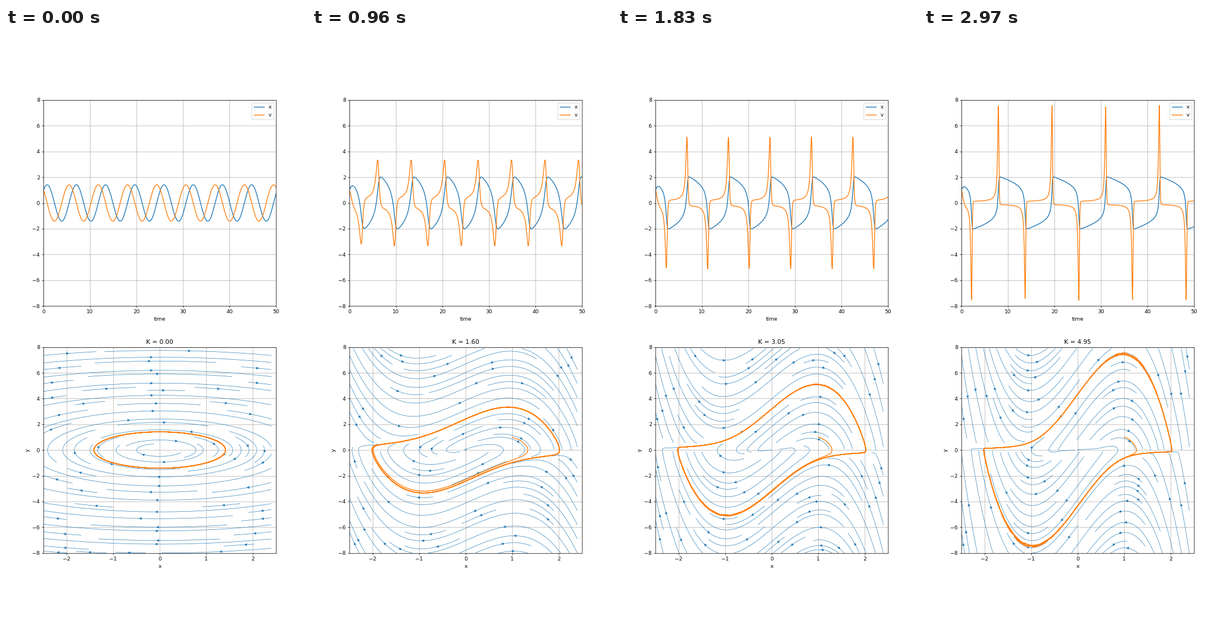
These frames come from a looping animation (529 px wide and 1058 px high, 3000 ms). A matplotlib script:

```python
import math
import numpy as np
import matplotlib.pyplot as plt
from matplotlib.animation import FuncAnimation
from matplotlib.collections import LineCollection, PolyCollection

FRAMES, INTERVAL = 100, 30
DPI = 66.125
K = 0.05 * np.arange(FRAMES)
STREAM_LW = 0.7

# Streamline grid and the coarser mask that keeps lines apart
GX, GY = np.arange(-2.5, 2.5, 0.1), np.arange(-8, 8, 0.1)
DX, DY = GX[1] - GX[0], GY[1] - GY[0]
MX, MY = len(GX) - 1, len(GY) - 1
CELLS = 30
TO_MASK_X, TO_MASK_Y = (CELLS - 1) / MX, (CELLS - 1) / MY
MAX_STEP, MAX_ERROR = 1 / CELLS, 0.003
MIN_LENGTH, MAX_LENGTH = 0.1, 2.0


def accel(x, v, k):
    return k * (1 - x * x) * v - x


def solve(t, substeps=6):
    """Van der Pol oscillator for all values of K at once (RK4)."""
    x, v = np.ones(FRAMES), np.ones(FRAMES)
    xs, vs = [x], [v]
    h = (t[1] - t[0]) / substeps
    for _ in t[1:]:
        for _ in range(substeps):
            a1 = accel(x, v, K)
            v2 = v + h / 2 * a1
            a2 = accel(x + h / 2 * v, v2, K)
            v3 = v + h / 2 * a2
            a3 = accel(x + h / 2 * v2, v3, K)
            v4 = v + h * a3
            a4 = accel(x + h * v3, v4, K)
            x = x + h / 6 * (v + 2 * v2 + 2 * v3 + v4)
            v = v + h / 6 * (a1 + 2 * a2 + 2 * a3 + a4)
        xs.append(x)
        vs.append(v)
    return np.array(xs).T, np.array(vs).T


def spiral(n):
    """Cells of an n by n mask from the rim inwards."""
    x0, y0, x1, y1 = 0, 1, n - 1, n - 1
    x = y = 0
    way = "right"
    for _ in range(n * n):
        yield x, y
        if way == "right":
            x += 1
            if x >= x1:
                x1 -= 1
                way = "up"
        elif way == "up":
            y += 1
            if y >= y1:
                y1 -= 1
                way = "left"
        elif way == "left":
            x -= 1
            if x <= x0:
                x0 += 1
                way = "down"
        else:
            y -= 1
            if y <= y0:
                y0 += 1
                way = "right"


def inside(x, y):
    return 0 <= x <= MX and 0 <= y <= MY


def cell(x, y):
    return round(x * TO_MASK_X), round(y * TO_MASK_Y)


def make_field(k):
    """Unit-speed direction at a grid position, bilinear between nodes."""
    X, Y = np.meshgrid(GX, GY)
    u, v = Y / DX, accel(X, Y, k) / DY
    speed = np.hypot(u / MX, v / MY).tolist()
    u, v = u.tolist(), v.tolist()

    def field(x, y, sign):
        if not inside(x, y):
            return None
        i, j = int(x), int(y)
        i2, j2 = min(i + 1, MX), min(j + 1, MY)
        a, b = x - i, y - j
        w00, w01 = (1 - a) * (1 - b), a * (1 - b)
        w10, w11 = (1 - a) * b, a * b

        def at(g):
            lo, hi = g[j], g[j2]
            return lo[i] * w00 + lo[i2] * w01 + hi[i] * w10 + hi[i2] * w11

        scale = sign / max(at(speed), 1e-12)
        return at(u) * scale, at(v) * scale

    return field


def edge_step(x, y, cx, cy):
    """Length of a straight step to the border of the grid."""
    sx = math.inf if cx == 0 else (x / -cx if cx < 0 else (MX - x) / cx)
    sy = math.inf if cy == 0 else (y / -cy if cy < 0 else (MY - y) / cy)
    return min(sx, sy)


def streamlines(k):
    field = make_field(k)
    used = set()
    here = None
    trail = []

    def enter(c):
        """Claim a mask cell; False if another line holds it."""
        nonlocal here
        if c != here:
            if c in used:
                return False
            used.add(c)
            trail.append(c)
            here = c
        return True

    def trace(x, y, sign):
        ds, total, path = MAX_STEP, 0.0, []
        while inside(x, y):
            path.append((x, y))
            ax_, ay_ = field(x, y, sign)
            ahead = field(x + ds * ax_, y + ds * ay_, sign)
            if ahead is None:
                ds = edge_step(x, y, ax_, ay_)
                path.append((x + ax_ * ds, y + ay_ * ds))
                total += ds
                break
            dx = ds * 0.5 * (ax_ + ahead[0])
            dy = ds * 0.5 * (ay_ + ahead[1])
            error = math.hypot((dx - ds * ax_) / MX, (dy - ds * ay_) / MY)
            if error < MAX_ERROR:
                x += dx
                y += dy
                if not inside(x, y) or not enter(cell(x, y)):
                    break
                if total + ds > MAX_LENGTH:
                    break
                total += ds
            if error == 0:
                ds = MAX_STEP
            else:
                ds = min(MAX_STEP, 0.85 * ds * math.sqrt(MAX_ERROR / error))
        return total, path

    lines = []
    for start in spiral(CELLS):
        if start in used:
            continue
        x, y = start[0] * (1 / TO_MASK_X), start[1] * (1 / TO_MASK_Y)
        trail = []
        enter(cell(x, y))
        s1, back = trace(x, y, -1)
        here = cell(x, y)
        s2, front = trace(x, y, 1)
        if s1 + s2 > MIN_LENGTH:
            line = np.array(back[::-1] + front[1:])
            lines.append(line * (DX, DY) + (GX[0], GY[0]))
        else:
            used.difference_update(trail)
    return lines


def arrow_heads(lines, ax):
    """Triangles halfway along each line, in inches on the figure."""
    tails, tips = [], []
    for p in lines:
        s = np.cumsum(np.hypot(*np.diff(p, axis=0).T))
        n = np.searchsorted(s, s[-1] / 2)
        tails.append(p[n])
        tips.append(p[n:n + 2].mean(axis=0))
    to_pt = 72 / DPI
    tail = ax.transData.transform(tails) * to_pt
    tip = ax.transData.transform(tips) * to_pt
    d = tip - tail
    size = np.hypot(d[:, 0], d[:, 1])[:, None]
    d = d / np.maximum(size, 1e-9)
    side = np.column_stack([-d[:, 1], d[:, 0]])
    pad = 0.5 * STREAM_LW * math.sqrt(5)
    tip = tip - d * (np.where(size > 4, 2, 0) + pad)
    base = tip - 4 * d
    return np.stack([tip, base + 2 * side, base - 2 * side], axis=1) / 72


t = np.linspace(0, 50, 1000)
xs, vs = solve(t)

fig, (top, low) = plt.subplots(2, 1, figsize=(8, 16), dpi=DPI)
fig.subplots_adjust(left=0.125, right=0.9, bottom=0.125, top=0.88, hspace=0.2)

x_line, = top.plot(t, xs[0], label="x")
v_line, = top.plot(t, vs[0], label="v")
top.set(xlim=(0, 50), ylim=(-8, 8), xlabel="time")
top.grid()
top.legend(loc="best")

low.set(xlim=(-2.5, 2.5), ylim=(-8, 8), xlabel="x", ylabel="y")
low.grid()
title = low.set_title("")
stream = LineCollection([], colors="C0", linewidths=STREAM_LW, zorder=2)
heads = PolyCollection([], facecolors="C0", edgecolors="C0", zorder=2,
                       linewidths=STREAM_LW, joinstyle="round",
                       transform=fig.dpi_scale_trans)
low.add_collection(stream, autolim=False)
low.add_collection(heads, autolim=False)
orbit, = low.plot([], [], color="C1", scalex=False, scaley=False)


def update(i):
    x_line.set_ydata(xs[i])
    v_line.set_ydata(vs[i])
    orbit.set_data(xs[i], vs[i])
    title.set_text(f"K = {K[i]:.2f}")
    lines = streamlines(K[i])
    stream.set_segments(lines)
    heads.set_verts(arrow_heads(lines, low))
    return x_line, v_line, orbit, title, stream, heads


anim = FuncAnimation(fig, update, frames=FRAMES, interval=INTERVAL,
                     repeat=True, repeat_delay=0, blit=False)
plt.show()
```
